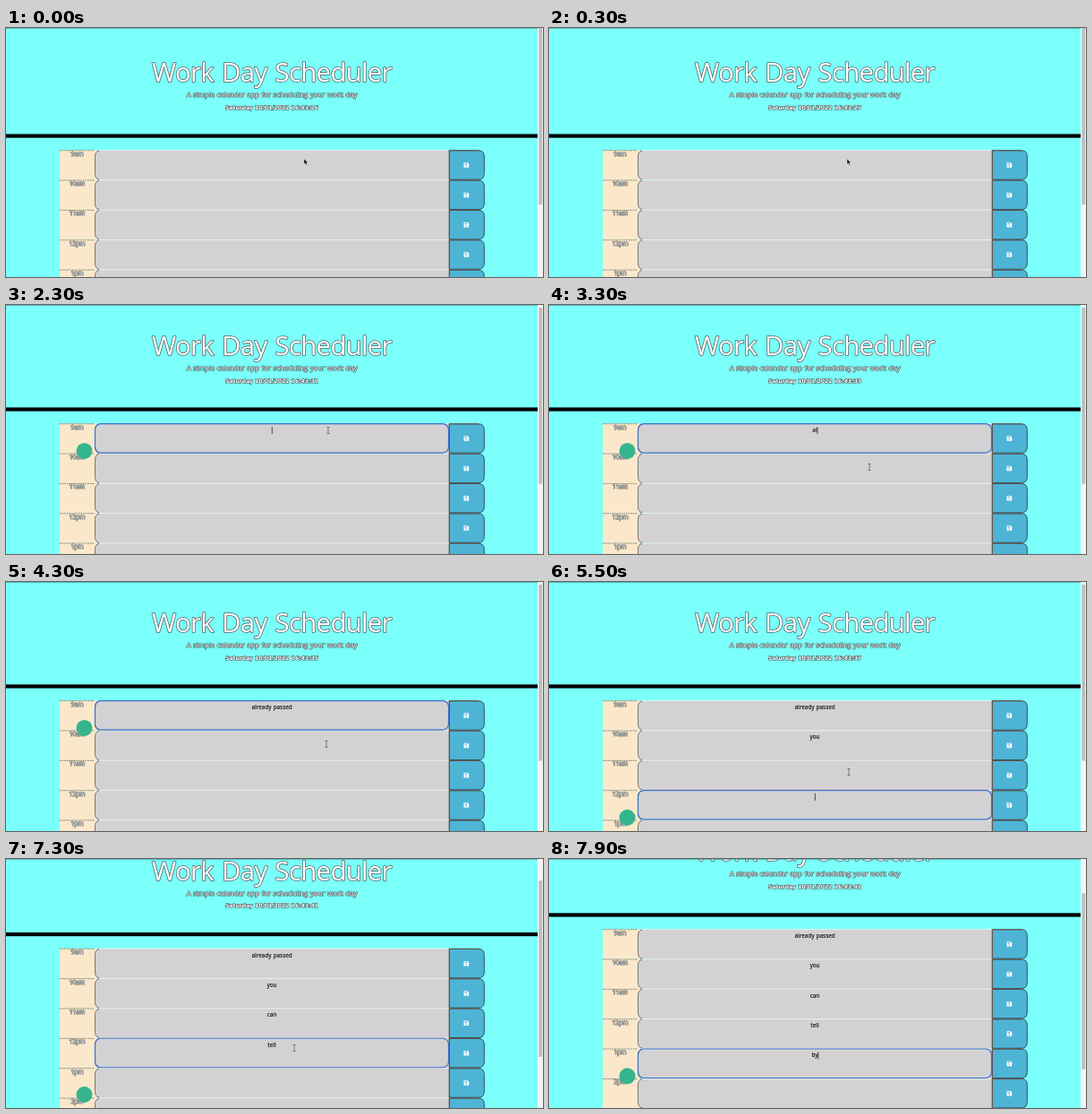
Write an HTML page that moves like this. It is 600 px wide and 278 px high and loops after 8 s.

```html
<!DOCTYPE html>
<html lang="en">
<head>
<meta charset="utf-8">
<title>Work Day Scheduler</title>
<style>
  html, body { margin: 0; width: 100%; height: 100%; overflow: hidden; background: #7afffa; }
  svg { display: block; width: 600px; height: 278px; font-family: "Open Sans", "Noto Sans", sans-serif; }
  text { text-anchor: middle; word-spacing: .07em; }
  .lit { fill: #fff; stroke: #3c4648; paint-order: stroke; stroke-linejoin: round; }
  .title { font-size: 29.3px; letter-spacing: -.65px; stroke: #566264; stroke-width: 1.5px; }
  .sub { font-size: 7.9px; letter-spacing: -.08px; stroke-width: 1px; }
  .clock { font: bold 6.1px "DejaVu Sans", sans-serif; word-spacing: 0; stroke-width: 1px; }
  .hour { font-size: 6.7px; stroke-width: .9px; }
  .note { font-size: 6.3px; font-weight: 600; letter-spacing: -.05px; fill: #111; }
  .area { fill: #d3d1d3; }
  .edge { fill: none; stroke: #6d6a6c; stroke-width: .9; }
  .focus { fill: none; stroke: #3a70c6; stroke-width: 1.2; }
  .save { fill: #4eb4d5; stroke: #2d4650; stroke-width: .9; }
  .ibeam { fill: none; stroke: #4a4a4a; stroke-width: .65; }
</style>
</head>
<body>
<svg id="stage" viewBox="0 0 600 278">
  <rect width="600" height="278" fill="#7afffa"/>
  <g id="page">
    <text class="lit title" x="297" y="60">Work Day Scheduler</text>
    <text class="lit sub" x="297" y="77.2">A simple calendar app for scheduling your work day</text>
    <text class="lit clock" id="clock" x="297" y="90.6"></text>
    <rect y="118.4" width="594" height="4.2"/>
    <g id="rows"></g>
    <rect class="focus" id="focus" x="99.5" width="395" height="32.5" rx="6.5"/>
    <path id="caret" stroke="#222" stroke-width=".8"/>
  </g>
  <circle id="badge" cx="87.5" r="9" fill="#35b58e"/>
  <rect width="594" height="1" fill="#3f8f90" opacity=".6"/>
  <rect x="594" width="6" height="278" fill="#f4f6f6"/>
  <rect id="thumb" x="595.3" width="3.8" height="197" rx="1" fill="#bcbebe"/>
  <g id="mouse">
    <path id="arrow" d="M0 0V6.2L1.5 4.9L2.5 7.2L3.6 6.7L2.6 4.5H4.5Z" fill="#111" stroke="#fff" stroke-width=".4"/>
    <path class="ibeam" id="ibeam" d="M-1.5 -3.5H1.5M0 -3.5V3.5M-1.5 3.5H1.5"/>
  </g>
</svg>
<script>
const LOOP = 8000, STEP = 100, TOP = 136.4, PITCH = 33.35, BLINK = 265;
const $ = id => document.getElementById(id);
const hours = ["9am", "10am", "11am", "12pm", "1pm", "2pm", "3pm"];

// row, time of the first key, ms per key
const typing = [
  { row: 0, text: "already passed", at: 3200, pace: 61 },
  { row: 1, text: "you", at: 4700, pace: 100 },
  { row: 2, text: "can", at: 6100, pace: 100 },
  { row: 3, text: "tell", at: 6600, pace: 100 },
  { row: 4, text: "by", at: 7800, pace: 100 }
];
// time, row
const clicks = [[2100, 0], [4500, 1], [5400, 3], [5900, 2], [6500, 3], [7600, 4]];
// time, offset
const scroll = [[0, 0], [300, 0], [600, 4], [6900, 4], [7200, 36.4], [7300, 36.4], [7500, 58]];
// time, x, y
const path = [
  [0, 333, 146], [300, 333, 146], [900, 238, 81], [1400, 238, 81], [2100, 360, 140],
  [2500, 360, 140], [2900, 358, 181], [4500, 358, 181], [5000, 345, 215], [5300, 338, 245],
  [5500, 335, 212], [6300, 335, 212], [6500, 322, 243], [6900, 322, 243], [7200, 322, 211],
  [7400, 322, 211], [7600, 320, 228]
];

const rowTop = i => TOP + PITCH * i;

function at(keys, t) {
  const i = keys.findIndex(k => k[0] > t);
  if (i < 0) return keys[keys.length - 1].slice(1);
  const a = keys[i - 1], b = keys[i], p = (t - a[0]) / (b[0] - a[0]);
  const e = p * p * (3 - 2 * p);
  return a.slice(1).map((v, j) => v + (b[j + 1] - v) * e);
}

$("rows").innerHTML = hours.map((hour, i) => `
  <g transform="translate(0 ${rowTop(i)})">
    <rect x="60" width="42" height="${PITCH}" fill="#fbe8cb"/>
    <path d="M60 .3H99" stroke="#6b645a" stroke-width=".8" stroke-dasharray="1.6 1"/>
    <text class="lit hour" x="79.5" y="6.2">${hour}</text>
    <path class="area" d="M495.3 0H106Q99.5 0 99.5 6.5V26.5Q99.5 ${PITCH} 106 ${PITCH}H495.3Z"/>
    <path class="save" d="M495.3 .4H528Q534.3 .4 534.3 7V26Q534.3 32.8 528 32.8H495.3Z"/>
    <path d="M495.3 .4V32.8M495.3 .3H528" stroke="#7c4a3c" stroke-width=".8"/>
    <path class="edge" d="M104 .6Q99.5 1.5 99.5 7V26Q99.5 32 104 32.7"/>
    <path d="M104 .1H494" stroke="#f0f0f0" stroke-width=".9"/>
    <path d="M511.5 13.9H515.8L517.2 15.3V19.4H511.5Z" fill="#fff"/>
    <path d="M512.5 14.7H515.2V16H512.5Z" fill="#4eb4d5"/>
    <circle cx="514.3" cy="17.7" r=".8" fill="#4eb4d5"/>
    <text class="note" id="note${i}" x="297" y="9.6"></text>
  </g>`).join("");

function draw(t) {
  const [offset] = at(scroll, t);
  const [mx, my] = at(path, t);
  const click = clicks.filter(c => c[0] <= t).pop();
  let lastKey = click ? click[0] : 0;

  $("page").setAttribute("transform", `translate(0 ${-offset})`);
  $("thumb").setAttribute("y", offset * .66);
  $("clock").textContent = "Saturday 10/01/2022 16:43:" + (26 + Math.floor((t + 200) / 500));

  for (const { row, text, at: start, pace } of typing) {
    const n = t < start ? 0 : Math.min(text.length, Math.floor((t - start) / pace) + 1);
    $("note" + row).textContent = text.slice(0, n);
    if (n) lastKey = Math.max(lastKey, start + (n - 1) * pace);
  }

  const shown = click ? "visible" : "hidden";
  for (const id of ["focus", "badge"]) $(id).setAttribute("visibility", shown);
  $("caret").setAttribute("visibility", click && (t - lastKey) % (2 * BLINK) < BLINK ? "visible" : "hidden");
  if (click) {
    const y = rowTop(click[1]);
    const x = 297 + $("note" + click[1]).getComputedTextLength() / 2 + .3;
    $("focus").setAttribute("y", y + .2);
    $("caret").setAttribute("d", `M${x} ${y + 3.6}v8`);
    // the badge keeps its place on screen while the page scrolls
    $("badge").setAttribute("cy", y + PITCH - 2.8 - at(scroll, click[0])[0]);
  }

  const text = t >= 2000;
  $("mouse").setAttribute("transform", `translate(${mx} ${my})`);
  $("mouse").setAttribute("visibility", t >= 7800 ? "hidden" : "inherit");
  $("arrow").setAttribute("display", text ? "none" : "inline");
  $("ibeam").setAttribute("display", text ? "inline" : "none");
}

function tick() {
  draw(Math.floor(performance.now() % LOOP / STEP) * STEP);
  requestAnimationFrame(tick);
}
tick();
</script>
</body>
</html>
```
